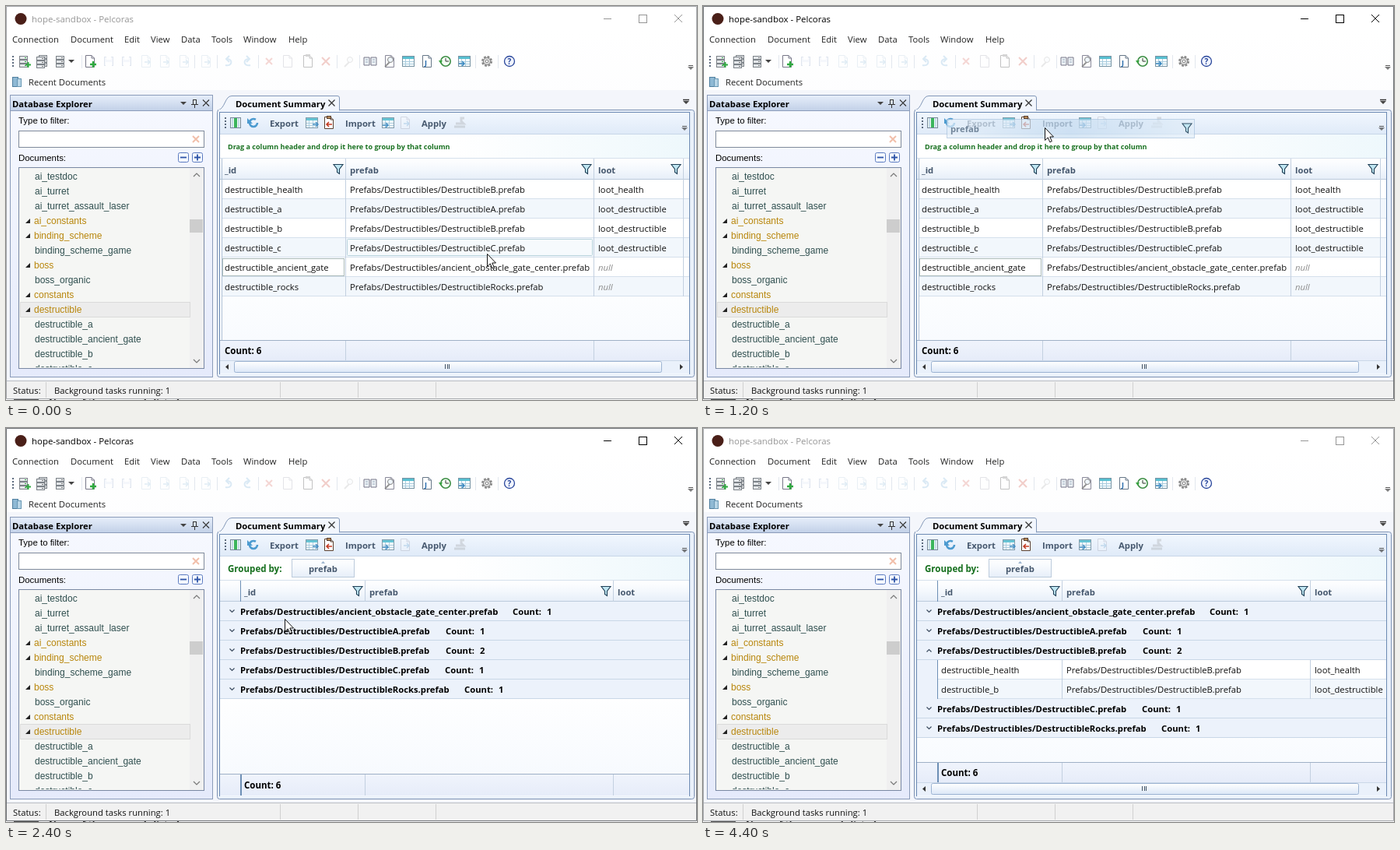
Recreate the animation shown at these times as an HTML page. Size 888x506 px, loop 4600 ms.

```html
<!DOCTYPE html>
<html lang="en">
<head>
<meta charset="utf-8">
<title>Grouping a document table</title>
<style>
html,body{margin:0;width:888px;height:506px;overflow:hidden;background:#fff}
svg{display:block;width:888px;height:506px}
text{font:11.25px "Open Sans","Noto Sans",sans-serif;white-space:pre}
.b{font-weight:700}
.i{font-style:italic}
.ar{font-family:"Liberation Sans",Arial,sans-serif}
</style>
</head>
<body>
<svg id="stage" viewBox="0 0 888 506"></svg>
<script>
const stage = document.getElementById('stage');

// drawing helpers, each returns markup
const box = (x, y, w, h, fill, line, extra = '') => line
  ? `<rect x="${x + .5}" y="${y + .5}" width="${w - 1}" height="${h - 1}" fill="${fill}" stroke="${line}" ${extra}/>`
  : `<rect x="${x}" y="${y}" width="${w}" height="${h}" fill="${fill}" ${extra}/>`;
const path = (d, line, fill = 'none', w = 1, extra = '') =>
  `<path d="${d}" stroke="${line}" fill="${fill}" stroke-width="${w}" ${extra}/>`;
const text = (x, y, s, fill = '#111', cls = '', size = 11.25) =>
  `<text x="${x}" y="${y}" fill="${fill}" class="${cls}" style="font-size:${size}px">${s}</text>`;
const bold = (x, y, s, fill = '#000', size = 11.25) => text(x, y, s, fill, 'b', size);
const group = (s, attrs = '') => `<g ${attrs}>${s}</g>`;
const at = (x, y, s, o = 1) => group(s, `transform="translate(${x} ${y})" opacity="${o}"`);
const vline = (x, y, h, c) => box(x, y, 1, h, c);
const hline = (x, y, w, c) => box(x, y, w, 1, c);
const grad = (id, stops, flat) =>
  `<linearGradient id="${id}" x2="${flat ? 1 : 0}" y2="${flat ? 0 : 1}">` +
  stops.map((c, i) => `<stop offset="${i / (stops.length - 1)}" stop-color="${c}"/>`).join('') + '</linearGradient>';

const EDGE = '#d5e0ec', RULE = '#c3d0e0', NAVY = '#46586e', BLUE = '#6d8fb5';

const defs = '<defs>' +
  grad('chromeFill', ['#fff', '#fafbfd', '#f1f4fa']) +
  grad('sideFill', ['#f7f9ff', '#e5eafb']) +
  grad('capFill', ['#e6eefa', '#c3d1e8']) +
  grad('barFill', ['#f1f7fe', '#dfeaf8']) +
  grad('dropFill', ['#fff', '#fff', '#eef8fc'], true) +
  grad('headFill', ['#fff', '#f4f8fd', '#e6eef8']) +
  grad('hoverFill', ['#f2f8ff', '#c7dcf4']) +
  grad('ghostFill', ['#e6f0fa', '#c5dcf1', '#e2eef9'], true) +
  grad('sheetFill', ['#fff', '#fff', '#f5f9fe']) +
  grad('footFill', ['#f0f4fc', '#e6ecf9']) +
  grad('thumbFill', ['#fff', '#dbe7f7']) +
  '<clipPath id="listClip"><rect x="17" y="208" width="237" height="256"/></clipPath>' +
  '<clipPath id="viewClip"><rect x="275" y="165" width="603" height="307"/></clipPath></defs>';

// icons, centred on 0,0
const page = (c, mark = '') => path('M-5.5-7.5H2L5.5-4V7.5H-5.5Z M2-7.5V-4H5.5', c, '#fff') + mark;
const rack = c => [-7, -2, 3].map(y => box(-6, y, 11, 5, '#e4e7ea', '#7c8288') + box(1, y + 2, 2, 1, c)).join('');
const sheet = (mark = '') => box(-8, -7, 16, 14, '#f7fdff', '#7793a3') + box(-7, -6, 14, 3, '#58bfd0') +
  path('M-7 .5H7M-7 3.5H7M-3.5-3V6M1.5-3V6', '#a9cbdd') + mark;
const arrow = path('M-2 1H5M2-2L5 1 2 4', '#3a88c0', 'none', 1.5);
const cross = (c, r = 5, w = 2) => path(`M${-r} ${-r}L${r} ${r}M${r} ${-r}L${-r} ${r}`, c, 'none', w);
const disk = box(-6, -6, 12, 12, '#d9e3f2', '#7b93b8') + box(-3, -6, 6, 4, '#fff') + box(-4, 1, 8, 5, '#fff');
const swirl = d => path(`M${-4 * d} 5C${5 * d} 7 ${6 * d}-3 ${-2 * d}-3M${d}-7L${-3 * d}-3 ${d} 1`, '#5b9ed2', 'none', 2);
const glass = path('M1 1L-5 7', '#888', 'none', 2) + '<circle cx="2" cy="-2" r="3.5" fill="#eef6fc" stroke="#777"/>';
const funnel = path('M-6-6H6L1.5 0V6L-1.5 4V0Z', '#1f3f56', '#bfe6f2', 1.1);
const down = path('M-4-2H4L0 2Z', 'none', '#444');
const chevron = up => path(up ? 'M-3 2L0-1 3 2' : 'M-3-2L0 1 3-2', '#3c4c60', 'none', 1.2);
const grip = (x, y) => [0, 4, 8, 12].map(d => box(x, y + d, 2, 2, '#5d6b7e')).join('');

function chrome() {
  let s = box(0, 0, 888, 506, '#fff') + box(1, 32, 886, 449, 'url(#chromeFill)') + box(1, 108, 886, 373, '#f4f6fb');
  s += '<circle cx="19" cy="16.5" r="7.5" fill="#4a1f18"/>';
  const menu = { Connection: 8, Document: 83, Edit: 152, View: 186, Data: 225, Tools: 264, Window: 305, Help: 363 };
  for (const m in menu) s += text(menu[m], 47, m, '#222');
  // main toolbar
  s += grip(8, 64);
  s += at(23, 71, rack('#2faa3f') + path('M2 4.5H9M5.5 1V8', '#2faa3f', 'none', 2));
  s += at(48, 70, rack('#777')) + at(45, 72, rack('#777')) + at(70, 71, rack('#777')) + at(84, 71, down);
  s += at(108, 71, page('#778', path('M0 4H8M4 0V8', '#2faa3f', 'none', 2.4)));
  [132, 155].forEach(x => s += at(x, 71, disk, .22));
  [180, 204, 229, 257].forEach(x => s += at(x, 71, page('#7aa0c0', arrow), .15));
  s += at(286, 71, swirl(1), .22) + at(310, 71, swirl(-1), .22);
  s += at(338, 71, cross('#d04a3a', 4), .22) + at(362, 71, page('#889'), .22);
  s += at(388, 71, page('#555', box(-3, -9, 6, 3, '#888')), .35) + at(411, 71, cross('#d04a3a'), .27) + at(440, 71, glass, .18);
  s += at(468, 71, path('M-8-5H-1V5H-8ZM1-5H8V5H1Z', '#778', '#eef3f7') + path('M-6-2H-3M3-2H6M-6 1H-3M3 1H6', '#9ab'));
  s += at(493, 71, page('#889') + at(-1, 0, glass, .9));
  s += at(517, 71, sheet());
  s += at(541, 71, page('#678') + bold(-3, 5, 'J', '#2166a8', 9));
  s += at(565, 71, '<circle r="6.2" fill="#f4fff4" stroke="#3f8f47" stroke-width="1.6"/>' +
    path('M0-4V0H4', '#333') + path('M-9-1H-4L-6.5 3Z', 'none', '#37a33f'));
  s += at(589, 71, sheet(at(-5, 2, arrow)));
  s += at(618, 71, '<circle r="5.5" fill="#ddd" stroke="#888" stroke-width="3" stroke-dasharray="2.6 1.7"/>' +
    '<circle r="4.5" fill="#ddd" stroke="#888"/><circle r="1.8" fill="#fff" stroke="#888"/>');
  s += at(647, 71, '<circle r="6.5" fill="#f1f5ff" stroke="#2a479b" stroke-width="1.3"/>' + bold(-2.5, 4, '?', '#2a479b', 10));
  [97, 242, 271, 324, 425, 454, 603, 632].forEach(x => s += vline(x, 63, 17, '#e2e7ee'));
  s += path('M877 76.5H883', '#555') + at(880, 80, down, .7);
  s += box(8, 91, 8, 13, '#8fb9d4', '#4f7f9f') + box(14, 93, 6, 11, '#b8d5e6', '#6797b4') + text(29, 102, 'Recent Documents', '#222');
  // status bar
  s += box(1, 481, 886, 23, '#f1f1f1') + hline(1, 481, 886, '#b9bdc4');
  [51, 352, 452, 552].forEach(x => s += vline(x, 483, 20, '#d0d0d0'));
  s += text(9, 498, 'Status:') + text(62, 498, 'Background tasks running: 1');
  s += box(10, 505, 32, 1, '#555') + bold(55, 514, 'None of these records listed', '#222', 12) + text(200, 514, 'idle still', '#888');
  return s;
}

function sidebar() {
  let s = box(5, 114, 261, 363, 'url(#sideFill)', '#8b9cba') + box(6, 115, 259, 19, 'url(#capFill)') + hline(6, 134, 259, '#8b9cba');
  s += bold(8, 130, 'Database Explorer') + at(228, 125, down);
  s += path('M240.5 120.5V126M244.5 120.5V126M240 120.5H245M238 126.5H247M242.5 127V131', '#333') + at(257, 124.5, cross('#333', 4, 1.2));
  s += text(16, 151, 'Type to filter:', '#000', 'ar', 11.45) + box(16, 160, 239, 22, '#fff', '#7f8a9a') + at(244, 171, cross('#e99c7c', 4), .65);
  s += text(16, 199, 'Documents:', '#000', 'ar', 11.45);
  [221, 239].forEach((x, i) => s += box(x, 188, 14, 13, '#f4f8ff', '#5c7bc0', 'rx="2"') +
    path(`M${x + 3} 194.5H${x + 11}` + (i ? `M${x + 7} 190.5V198.5` : ''), '#2e54a8', 'none', 1.8));
  s += box(16, 207, 239, 259, '#f5f6f4', '#7988a3') + box(236, 208, 18, 257, '#f0f0f0');
  s += box(236, 274, 17, 17, '#cdcdcd') + path('M241 219L245 215 249 219M241 454L245 458 249 454', '#777', 'none', 1.2);
  s += box(18, 380, 219, 20, '#ececec', '#dadada');
  // a leading + marks a folder
  const tree = ['ai_testdoc', 'ai_turret', 'ai_turret_assault_laser', '+ai_constants', '+binding_scheme', 'binding_scheme_game',
    '+boss', 'boss_organic', '+constants', '+destructible', 'destructible_a', 'destructible_ancient_gate', 'destructible_b', 'destructible_c'];
  let rows = '';
  tree.forEach((n, i) => {
    const y = 219 + 19 * i;
    rows += n[0] === '+'
      ? path(`M31 ${y - 3}V${y + 3}H25Z`, 'none', '#222') + text(36, y + 4, n.slice(1), '#b8860b', 'ar', 12)
      : text(37, y + 4, n, '#2f4f4f', 'ar', 12);
  });
  return s + group(rows, 'clip-path="url(#listClip)"');
}

function frame() {
  let s = box(271, 133, 614, 344, '#e9f0fa', '#7d92b4', 'rx="3"');
  s += path('M272 134C282 132 281 115.5 290 115.5H426Q428.5 115.5 428.5 118V134Z', '#8398b8', '#f2f6fd') + box(273, 133, 155, 3, '#f0f5fd');
  s += bold(295, 130, 'Document Summary') + at(418.5, 124.5, cross('#333', 4, 1.2));
  s += path('M870 120.5H878', '#333', 'none', 1.5) + at(874, 124, down);
  s += box(274, 136, 605, 337, '#fff', '#6c8ab3') + box(275, 137, 603, 28, 'url(#barFill)') + hline(275, 164, 603, '#c8d6e8');
  s += grip(281, 143);
  s += at(295, 150, box(-7, -7, 14, 14, '#effaf4', '#789') + box(-2, -6, 4, 12, '#3bb55c') + path('M-4-6V6M4-6V6', '#9bd'));
  s += at(318, 150, '<circle r="5" fill="none" stroke="#4d9bd0" stroke-width="2.6" stroke-dasharray="26 6"/>' + path('M-8-6V1H-1Z', 'none', '#4d9bd0'));
  s += at(393, 150, sheet(at(3, 1, arrow)), .9);
  s += at(415, 150, page('#5a4030', box(-3, -9, 6, 4, '#b98b57', '#5a4030') + path('M4 2H-3M0-1L-3 2 0 5', '#c33b22', 'none', 1.6)));
  s += at(491, 150, sheet(at(-5, 2, arrow)), .9) + at(513, 150, page('#778', arrow), .22);
  s += at(583, 150, path('M-7 5H7M-5 1H5L2-2V-6H6', '#888', 'none', 3), .25);
  s += bold(339, 155, 'Export', NAVY) + bold(436, 155, 'Import', NAVY) + bold(534, 155, 'Apply', NAVY);
  s += path('M869 154.5H875', '#555') + at(872, 158, down, .7);
  s += box(275, 165, 603, 30, 'url(#dropFill)') + hline(275, 195, 603, EDGE);
  return s + box(275, 196, 603, 277, 'url(#sheetFill)') + box(275, 196, 603, 27, 'url(#headFill)') + hline(275, 222, 603, '#bccbdc');
}

function footer(x, cols, scroll) {
  const y = scroll ? 429 : 444, h = scroll ? 26 : 29;
  let s = box(275, y, 603, h, 'url(#footFill)') + hline(275, y, 603, '#9fb0c6');
  cols.forEach(c => s += vline(c, y + 1, h - 1, RULE));
  s += bold(x, y + (scroll ? 18 : 19), 'Count: 6', '#000', 11.5);
  if (scroll) s += box(275, 455, 603, 17, '#eaf1fb') + hline(275, 455, 603, '#cbd8e8') +
    box(293, 456, 550, 15, 'url(#thumbFill)', '#9db4d2', 'rx="2"') +
    path('M564.5 460V466M567.5 460V466M569.5 460V466', '#456') +
    path('M286 460V467L282 463.5ZM866 460V467L870 463.5Z', 'none', '#333');
  return s;
}

const dir = 'Prefabs/Destructibles/';
const flatRows = [['health', 'DestructibleB', 'loot_health'], ['a', 'DestructibleA', 'loot_destructible'],
  ['b', 'DestructibleB', 'loot_destructible'], ['c', 'DestructibleC', 'loot_destructible'],
  ['ancient_gate', 'ancient_obstacle_gate_center', ''], ['rocks', 'DestructibleRocks', '']];
const cells = ([id, pre, loot], y, x0, x1, x2) => text(x0, y, 'destructible_' + id) + text(x1, y, `${dir}${pre}.prefab`) +
  (loot ? text(x2, y, loot) : text(x2, y, 'null', '#8a8a8a', 'i'));

function flat() {
  let s = bold(285, 184, 'Drag a column header and drop it here to group by that column', '#17701f', 9.05);
  s += group(box(437, 196, 318, 26, 'url(#hoverFill)'), 'id="hover"');
  s += bold(281, 215, '_id', NAVY) + bold(442, 215, 'prefab', NAVY) + bold(761, 215, 'loot', NAVY);
  [427, 746, 861].forEach(x => s += at(x, 209.5, funnel));
  flatRows.forEach((r, i) => {
    const y = 223 + 25 * i;
    if (i % 2) s += box(278, y, 600, 25, '#f2f7fc');
    s += hline(278, y + 24, 600, EDGE);
  });
  s += vline(277, 196, 277, '#aebfd4') + [436, 755, 870].map(x => vline(x, 196, 177, RULE)).join('');
  s += box(278, 324, 157, 23, '#fff', '#a9b9b9') + '<g id="cell"></g>';
  flatRows.forEach((r, i) => s += cells(r, 240 + 25 * i, 281, 442, 761));
  return s + footer(281, [436, 755], true);
}

const groups = [['ancient_obstacle_gate_center', 1, 651], ['DestructibleA', 1, 565], ['DestructibleB', 2, 565],
  ['DestructibleC', 1, 564], ['DestructibleRocks', 1, 589]];

function grouped(open) {
  // the hint of the flat view is replaced by the grouping chip
  let s = bold(285, 185, 'Grouped by:', '#17701f', 11.55);
  s += box(367, 168, 81, 24, 'url(#headFill)', '#bccbdc') + bold(389, 185, 'prefab', NAVY) + path('M405 174L407.5 171 410 174Z', 'none', '#9bb3cc');
  s += vline(301, 196, 27, BLUE) + [461, 780].map(x => vline(x, 196, 27, RULE)).join('');
  s += bold(306, 215, '_id', NAVY) + bold(467, 215, 'prefab', NAVY) + bold(786, 215, 'loot', NAVY);
  s += at(452, 209.5, funnel) + at(771, 209.5, funnel);
  let y = 223;
  groups.forEach(([name, n, x], i) => {
    const up = open && i === 2;
    s += box(275, y, 603, 25, '#ecf2fb') + hline(275, y + 24, 603, '#c9d7e7') + at(290.5, y + 12.5, chevron(up));
    s += bold(301, y + 17, `${dir}${name}.prefab`) + bold(x, y + 17, 'Count:') + bold(x + 44, y + 17, n);
    y += 25;
    if (!up) return;
    [flatRows[0], flatRows[2]].forEach((r, k) => {
      s += box(275, y, 27, 25, '#ecf2fb') + box(302, y, 576, 25, k ? '#f2f7fc' : '#fff') + hline(302, y + 24, 576, EDGE);
      s += [301, 461, 780].map(c => vline(c, y, 25, c === 301 ? BLUE : RULE)).join('') + cells(r, y + 17, 306, 467, 786);
      y += 25;
    });
  });
  return s + footer(306, [461, 780], open) + box(301, open ? 430 : 445, 2, open ? 25 : 28, BLUE);
}

const windowKeys = path('M768 16.5H778', 'currentColor') + box(813, 11, 11, 11, 'none', 'currentColor') +
  path('M859 11L869 21M869 11L859 21', 'currentColor') + text(33, 21, 'hope-sandbox - Pelcoras', 'currentColor', '', 11.45);
const ghost = box(0, 0, 319, 25, 'url(#ghostFill)', '#a9c3de', 'opacity=".7"') + bold(5, 17, 'prefab', '#71859a') + at(309, 12, funnel, .9);
const pointer = path('M.5.5V16.5L4.3 13 6.8 18.8 9.3 17.7 6.8 12H11.5Z', '#111', '#fff');

const view = (id, s) => group(s, `id="${id}" clip-path="url(#viewClip)"`);
stage.innerHTML = defs + chrome() + sidebar() + frame() +
  view('flat', flat()) + view('shut', grouped(false)) + view('open', grouped(true)) +
  group(windowKeys, 'id="keys"') + group(path('M.5 504.5V.5H887.5V504.5Z', 'currentColor'), 'id="edge"') +
  group(ghost, 'id="ghost"') + group(pointer, 'id="pointer"');

const el = id => document.getElementById(id);
const show = (id, on) => el(id).setAttribute('display', on ? 'inline' : 'none');
const move = (id, x, y) => el(id).setAttribute('transform', `translate(${x} ${y})`);

const STEP = 200, LOOP = 4600;
// pointer stops: step, x, y
const stops = [[0, 618, 318], [1, 612, 300], [2, 590, 255], [3, 566, 214], [4, 561, 207], [5, 545, 198], [6, 439, 156],
  [7, 492, 182], [10, 492, 182], [12, 358, 245], [14, 293, 281], [17, 293, 281], [18, 382, 490]];

function pointerAt(k) {
  const j = stops.findIndex(s => s[0] >= k);
  if (j < 0) return null;
  const b = stops[j], a = stops[Math.max(0, j - 1)];
  const f = b[0] === a[0] ? 1 : (k - a[0]) / (b[0] - a[0]);
  return [Math.round(a[1] + (b[1] - a[1]) * f), Math.round(a[2] + (b[2] - a[2]) * f)];
}

let last = -1;
function render(ms) {
  const k = Math.floor(ms % LOOP / STEP);
  if (k === last) return;
  last = k;
  const p = pointerAt(k), active = k >= 4 && k < 21, drag = k >= 5 && k < 9;
  show('flat', k < 9);
  show('shut', k >= 9 && k < 14);
  show('open', k >= 14);
  show('pointer', p);
  show('ghost', drag);
  el('keys').setAttribute('color', active ? '#000' : '#969696');
  el('edge').setAttribute('color', active ? '#6e7276' : '#a3a6aa');
  if (p) {
    move('pointer', ...p);
    move('ghost', p[0] - 126, p[1] - 11);
  }
  show('hover', !drag && p && p[1] >= 196 && p[1] < 223);
  const row = p && !drag ? Math.floor((p[1] - 223) / 25) : -1;
  el('cell').innerHTML = row >= 0 && row < 6 ? box(438, 224 + 25 * row, 316, 22, '#f6fafd', '#b9d3dc', 'rx="1"') : '';
}

const start = performance.now();
(function tick() {
  render(performance.now() - start);
  requestAnimationFrame(tick);
})();
</script>
</body>
</html>
```
